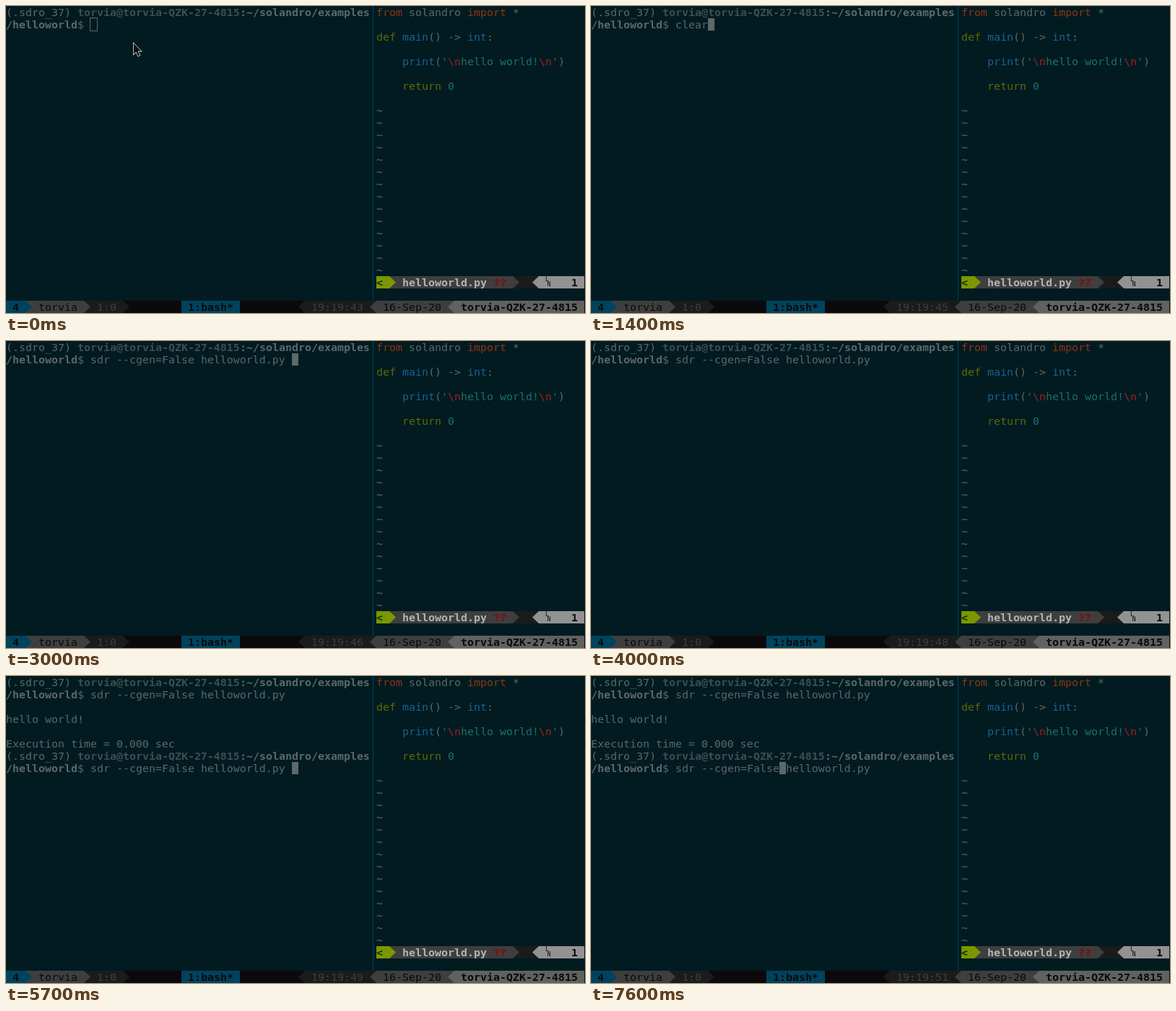
These frames come from a looping animation (802 by 425 pixels, 8000 ms). An HTML page with a canvas:

```html
<!DOCTYPE html>
<html lang="en">
<head>
<meta charset="utf-8">
<title>Terminal session</title>
<style>
  html, body { margin: 0; width: 100%; height: 100%; overflow: hidden; background: #011b21; }
  canvas { display: block; }
</style>
</head>
<body>
<canvas id="stage" width="802" height="425"></canvas>
<script>
const ctx = document.getElementById('stage').getContext('2d');
const LOOP = 8000, CELL_W = 9, CELL_H = 17, BASELINE = 14, COLUMNS = 89;
const EDITOR_COL = 57, PROMPT_COL = 13;
const FONT = 'px "DejaVu Sans Mono", monospace';

const BG = '#011b21', FG = '#5c6869', DIM = '#3e4d52', BLUE = '#1b6193', CYAN = '#1d716a',
      GREEN = '#5d6b00', ORANGE = '#8e350f', RED = '#9a2321';
const BAR_BLUE = '#00435f', BAR_LIME = '#7b9700', INK = '#0a0a0a', DARK = '#1b1b1b',
      GREY = '#3e3e3e', MID = '#616161', LIGHT = '#929292', WHITE = '#b3b3b3';

const USER = 'torvia', HOST = 'torvia-QZK-27-4815', PROJECT = 'solandro';
const command = flag => `sdr --cgen=${flag} helloworld.py `;

const CLICK = 400, FOCUS = 800, TYPING = 1200, ENTER = 3500, OUTPUT = 4500, RECALL = 5700;
const HALF_BLINK = 600;
const leftPresses = { 6900: 5, 7000: 5, 7400: 4, 7600: 1 };
const keyTimes = [FOCUS, 1400, 1800, 2900, RECALL, 6500, ...Object.keys(leftPresses).map(Number)];

function firstCommand(t) {
  if (t < 1400) return '';
  if (t < 1800) return 'clear';
  return command(t < 3000 ? 'True' : 'False');
}

function text(row, col, string, color = FG, bold = false, size = 14.95) {
  ctx.font = (bold ? 'bold ' : '') + size + FONT;
  ctx.fillStyle = color;
  ctx.fillText(string, col * CELL_W, row * CELL_H + BASELINE);
}

// Writes [string, color, bold] parts one after another.
function line(row, col, ...parts) {
  for (const [string, color, bold] of parts) {
    text(row, col, string, color, bold);
    col += string.length;
  }
}

function band(row, col, width, color) {
  ctx.fillStyle = color;
  ctx.fillRect(col * CELL_W, row * CELL_H, width * CELL_W, CELL_H);
}

// One-cell triangle; dir 1 points right, -1 points left.
function wedge(row, col, dir, color) {
  const flat = (dir > 0 ? col : col + 1) * CELL_W, y = row * CELL_H;
  ctx.fillStyle = color;
  ctx.beginPath();
  ctx.moveTo(flat, y);
  ctx.lineTo(flat + dir * CELL_W, y + CELL_H / 2);
  ctx.lineTo(flat, y + CELL_H);
  ctx.fill();
}

// Chains [label, background, color, bold] segments from an edge towards dir,
// each closed by a wedge over the next background.
function segments(row, edge, dir, base, ...parts) {
  parts.forEach(([label, fill, color, bold], i) => {
    const width = label.length;
    const start = dir > 0 ? edge : edge - width;
    const tip = dir > 0 ? start + width : start - 1;
    band(row, start, width, fill);
    band(row, tip, 1, parts[i + 1] ? parts[i + 1][1] : base);
    wedge(row, tip, dir, fill);
    text(row, start, label, color, bold);
    edge = dir > 0 ? tip + 1 : tip;
  });
}

function prompt(row, typed) {
  line(row, 0, ['(.sdro_37) '], [`${USER}@${HOST}`, DIM, true],
    [`:~/${PROJECT}/examples`, FG, true]);
  line(row + 1, 0, ['/helloworld', FG, true], ['$ '], [typed]);
}

function editor() {
  const code = [
    [['from ', ORANGE], [PROJECT + ' '], ['import ', ORANGE], ['*']],
    [['def ', GREEN], ['main', BLUE], ['() -> '], ['int', BLUE], [':']],
    [['    print', BLUE], ['('], ["'", CYAN], ['\\n', RED], ['hello world!', CYAN],
      ['\\n', RED], ["'", CYAN], [')']],
    [['    return ', GREEN], ['0', CYAN]]
  ];
  code.forEach((parts, i) => line(2 * i, EDITOR_COL, ...parts));

  const bar = 22;
  for (let row = 2 * code.length; row < bar; row++) text(row, EDITOR_COL, '~');
  band(bar, EDITOR_COL, COLUMNS - EDITOR_COL, DARK);
  segments(bar, EDITOR_COL, 1, DARK,
    ['< ', BAR_LIME, '#123000', true], [' helloworld.py    ', GREY, WHITE, true]);
  segments(bar, COLUMNS, -1, DARK, ['     1 ', LIGHT, INK, true]);
  text(bar, 75, '??', '#970000', true);
  text(bar - .4, 83, 'L', INK, false, 8);
  text(bar, 83.3, 'N', INK, false, 8);
}

function statusBar(t) {
  const row = 24, second = Math.floor(t / 1000);
  const delay = [0, 3, 7].includes(second) ? 400 : 0;
  const shown = 43 + second + (t % 1000 >= delay);
  const black = '#0c090c';
  band(row, 0, COLUMNS + 1, black);
  segments(row, 0, 1, black,
    [' 4 ', BAR_BLUE, INK, true], [` ${USER} `, GREY, INK], [' 1:0 ', DARK, GREY]);
  segments(row, COLUMNS, -1, black,
    [` ${HOST} `, MID, INK, true], [' 16-Sep-20 ', GREY, INK], [` 19:19:${shown} `, DARK, GREY]);
  band(row, 27, 9, BAR_BLUE);
  text(row, 28, '1:bash*', INK, true);
}

function cursor(t, typed) {
  const lastKey = Math.max(0, ...keyTimes.filter(time => time <= t));
  const blinkedOff = Math.floor((t - lastKey) / HALF_BLINK) % 2;
  const lefts = Object.entries(leftPresses)
    .reduce((sum, [time, count]) => sum + (t >= time ? count : 0), 0);
  const index = typed.length - lefts;
  const running = t >= ENTER && t < OUTPUT;
  const row = running ? 2 : t < ENTER ? 1 : 7;
  const col = running ? 0 : PROMPT_COL + index;

  if (t < FOCUS) {
    ctx.strokeStyle = FG;
    ctx.lineWidth = 1;
    ctx.strokeRect(col * CELL_W - .5, row * CELL_H - .5, CELL_W + 1, CELL_H + 1);
  } else if (!blinkedOff) {
    band(row, col, 1, FG);
    if (!running) text(row, col, typed[index] || ' ', BG);
  }
}

function pointer(t) {
  if (t >= TYPING) return;
  const shape = new Path2D(t < CLICK
    ? 'M176.7 51.5V67L180.2 63.6L183 69.4L185.4 68.3L182.7 62.5H187.3Z'
    : 'M181 52.5H187M184 52.5V68.5M181 68.5H187');
  ctx.strokeStyle = '#fff';
  ctx.lineWidth = t < CLICK ? 1.3 : 3;
  ctx.stroke(shape);
  ctx.fillStyle = ctx.strokeStyle = '#111';
  ctx.lineWidth = 1;
  if (t < CLICK) ctx.fill(shape);
  else ctx.stroke(shape);
}

function draw(t) {
  ctx.fillStyle = BG;
  ctx.fillRect(0, 0, 802, 425);
  ctx.fillStyle = BAR_BLUE;
  ctx.fillRect(508, 0, 1, 408);

  const first = firstCommand(t), second = t < RECALL ? '' : command('False');
  prompt(0, first);
  if (t >= OUTPUT) {
    text(3, 0, 'hello world!');
    text(5, 0, 'Execution time = 0.000 sec');
    prompt(6, second);
  }
  editor();
  statusBar(t);
  cursor(t, t < OUTPUT ? first : second);
  pointer(t);
}

const start = performance.now();
function frame() {
  draw((performance.now() - start) % LOOP);
  requestAnimationFrame(frame);
}
frame();
</script>
</body>
</html>
```
